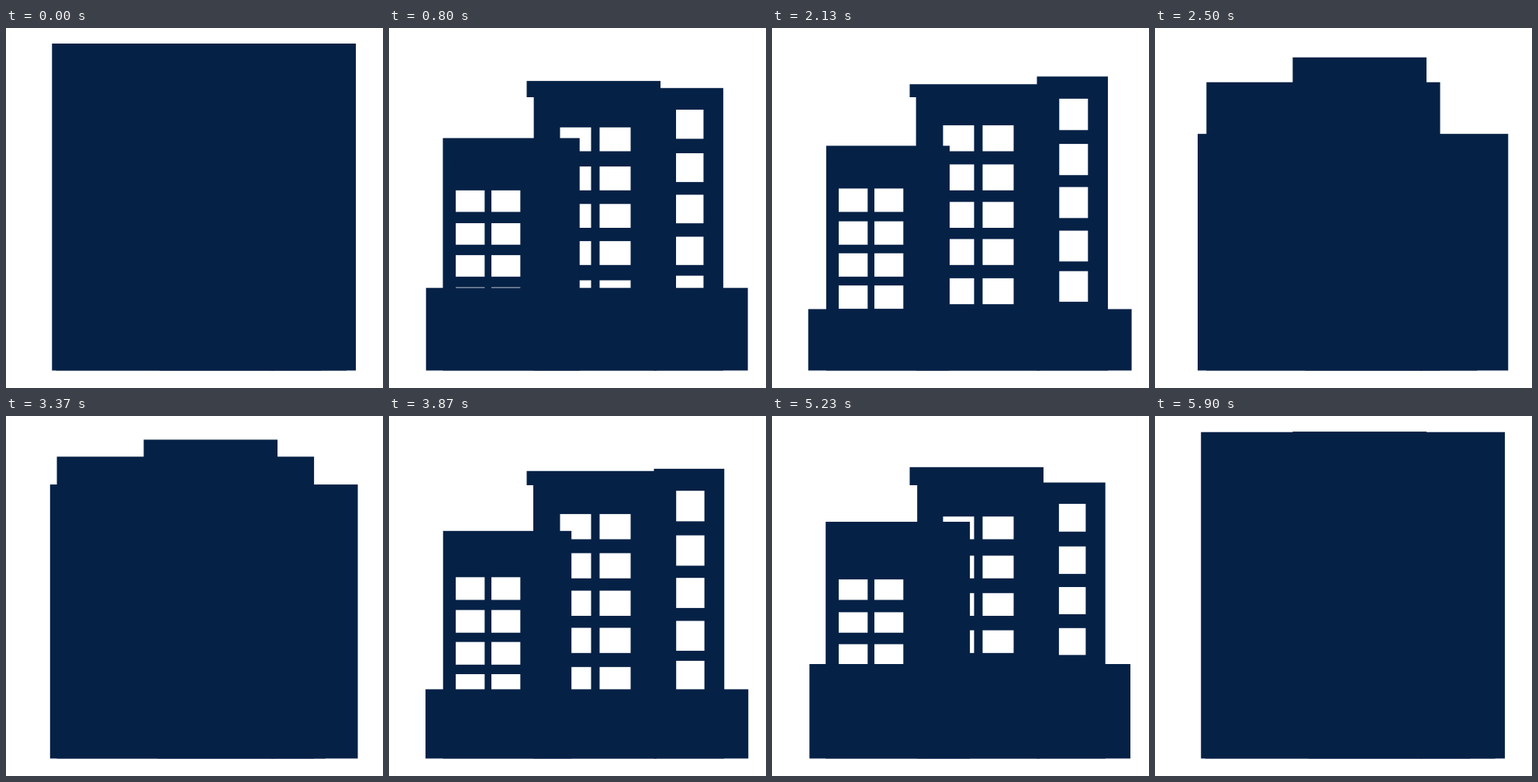
These frames come from a looping animation (486 by 463 pixels, 6.03 s). An HTML page with a canvas:

```html
<!DOCTYPE html>
<html lang="en">
<head>
<meta charset="utf-8">
<title>Buildings</title>
<style>
html, body { margin: 0; width: 100%; height: 100%; overflow: hidden; background: #fff; }
canvas { display: block; }
</style>
</head>
<body>
<canvas id="stage" width="486" height="463"></canvas>
<script>
const ctx = document.getElementById('stage').getContext('2d');
const NAVY = '#062146', WHITE = '#fff';
const GROUND = 440.5;
const LOOP = 6030, CYCLE = 3030;
const RISE = { start: 170, length: 1045 };
const FALL = { start: 1970, length: 930 };

const bezier = (a, b, t) => 3 * (1 - t) ** 2 * t * a + 3 * (1 - t) * t * t * b + t ** 3;

// cubic-bezier(.25, .15, .6, 1), solved by bisection
function ease(x) {
  if (x <= 0) return 0;
  if (x >= 1) return 1;
  let low = 0, high = 1;
  for (let i = 0; i < 24; i++) {
    const mid = (low + high) / 2;
    if (bezier(.25, .6, mid) < x) low = mid; else high = mid;
  }
  return bezier(.15, 1, low);
}

const progress = (phase, time) => ease((time - phase.start) / phase.length);

function box(left, top, right, bottom, color = NAVY) {
  ctx.fillStyle = color;
  ctx.fillRect(left, top, right - left, bottom - top);
}

// Two columns of panes that open upward from their sills
function paneGrid(columns, width, height, tops, rest) {
  for (const x of columns)
    for (const y of tops)
      box(x, y + height * rest, x + width, y + height, WHITE);
}

function draw(p) {
  const rest = 1 - p;
  const mix = (from, to) => from + (to - from) * p;
  box(0, 0, 486, 463, WHITE);

  // Middle building
  box(mix(198, 183), 86, 345, GROUND);
  box(177.5, mix(20, 83.5), 350, 89);
  paneGrid([220.5, 271.5], 40, 40.5, [118, 168.3, 216.5, 264.3, 314.7, 362.3], rest);

  // Tower
  box(341.5, mix(248.5, 22.5), mix(406.5, 438.7), GROUND);
  for (const y of [53, 117, 178, 239.7, 297, 354]) {
    const sill = y + 48.3;
    box(mix(367, 371), y + rest * (242.3 - .516 * y),
        mix(384, 412.3), sill + rest * (224.6 - .539 * sill), WHITE);
  }

  // Left building
  box(mix(64.5, 71), mix(27.6, 178), mix(439, 184), GROUND);
  paneGrid([86, 132], 37.3, 36.5, [200, 242.2, 283.3, 324.7, 366.3], rest);
  box(mix(184, 53.5), 168.5, 184, 178.5);

  // Ground slab
  box(mix(59.3, 44), mix(20, 434.7), mix(451, 466.3), GROUND);
}

function frame() {
  const time = performance.now() % LOOP % CYCLE;
  draw(progress(RISE, time) - progress(FALL, time));
  requestAnimationFrame(frame);
}
frame();
</script>
</body>
</html>
```
